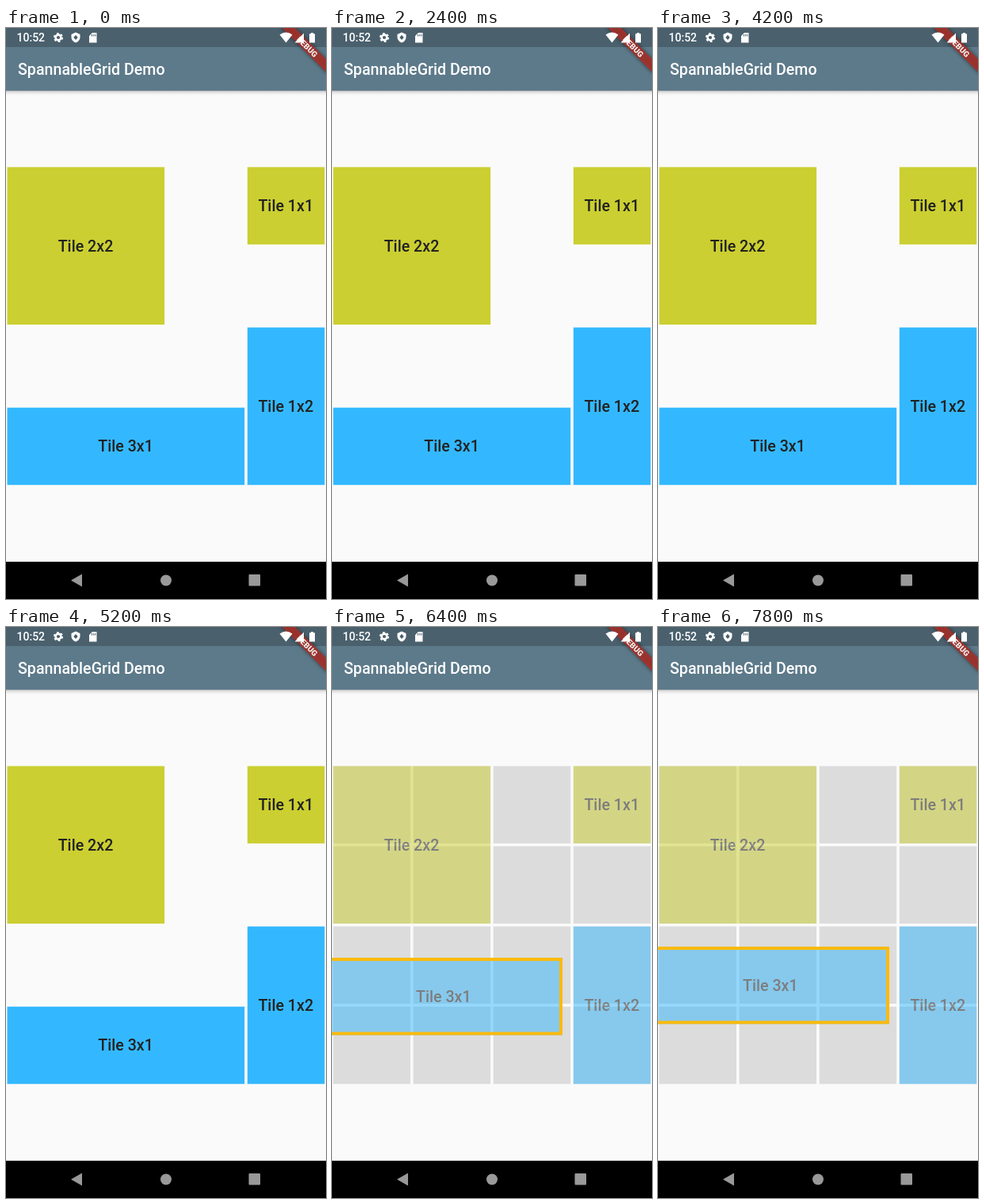
Animation, 404 px wide and 720 px high, one loop 8000 ms. Source, as an HTML page:

```html
<!DOCTYPE html>
<html lang="en">
<head>
<meta charset="utf-8">
<title>SpannableGrid Demo</title>
<style>
  html, body { margin: 0; width: 100%; height: 100%; overflow: hidden; background: #fafafa; }
  svg { display: block; width: 100%; height: 100%; }
  text { font-family: Roboto, sans-serif; font-weight: 500; }
  .label { font-size: 19.65px; fill: #212121; text-anchor: middle; }
</style>
</head>
<body>
<svg viewBox="0 0 404 720">
  <defs>
    <linearGradient id="shade" x2="0" y2="1">
      <stop offset="0" stop-color="#000" stop-opacity=".28"/>
      <stop offset=".35" stop-color="#000" stop-opacity=".09"/>
      <stop offset="1" stop-color="#000" stop-opacity="0"/>
    </linearGradient>
    <filter id="soft" x="-20%" y="-100%" width="140%" height="300%">
      <feGaussianBlur stdDeviation="2.5"/>
    </filter>
  </defs>
  <rect width="404" height="720" fill="#fafafa"/>

  <g id="cells" fill="#dcdcdc"></g>
  <g id="tiles"></g>

  <!-- app bar -->
  <rect y="79" width="404" height="6" fill="url(#shade)"/>
  <rect width="404" height="79" fill="#5d7a8a"/>
  <rect width="404" height="24" fill="#4a606d"/>
  <text x="15" y="58.7" font-size="19.65" fill="#fff">SpannableGrid Demo</text>

  <!-- corner ribbon -->
  <g transform="translate(404 0) rotate(45)">
    <rect x="-42" y="27.5" width="84" height="11.8" opacity=".5" filter="url(#soft)"/>
    <rect x="-42" y="27.5" width="84" height="11.8" fill="#a8312b" fill-opacity=".88"/>
    <text y="37" font-size="10" style="font-weight:900" fill="#f4eeee" text-anchor="middle">DEBUG</text>
  </g>

  <!-- status bar -->
  <g fill="#fff">
    <text x="13.5" y="17" font-size="14">10:52</text>
    <g transform="translate(66 12)">
      <circle r="3.4" fill="none" stroke="#fff" stroke-width="2.6"/>
      <circle r="5.1" fill="none" stroke="#fff" stroke-width="2" stroke-dasharray="2.67"/>
    </g>
    <path d="M88 5.5l5.5 2.4v3.7c0 3.2-2.3 6-5.5 7-3.2-1-5.500-3.800-5.500-7V7.900z"/>
    <path d="M88 8.700l2.700 3.200-2.700 3.200-2.700-3.200z" fill="#4a606d"/>
    <path d="M109 6h5.500v12.500h-9.500V10z"/>
    <path d="M108.500 8v2.500M110.700 8v2.500M112.800 8v2.500" stroke="#4a606d" stroke-width="1"/>
    <path d="M353.500 18.500L345.500 8.500q8-6 16 0z"/>
    <path d="M364.500 18.500L376 6.500v12z"/>
    <path d="M383 7.300h2V6h3v1.300h2v11.200h-7z"/>
  </g>

  <!-- navigation bar -->
  <rect y="673" width="404" height="47"/>
  <g fill="#999">
    <path d="M82 696.500l14-8v16z"/>
    <circle cx="202" cy="696.500" r="7"/>
    <rect x="306.500" y="689" width="14.500" height="14.500" rx="1"/>
  </g>
</svg>
<script>
const LOOP = 8000, STEP = 200, LIFT = 6400, SETTLE = 7200;
const PITCH = 101.1, SIZE = 97.5;
const LIME = '#cbcf31', BLUE = '#33b8ff';
const cells = document.getElementById('cells');
const tiles = document.getElementById('tiles');

function add(parent, name, attrs = {}, text = '') {
  const node = document.createElementNS('http://www.w3.org/2000/svg', name);
  for (const key in attrs) node.setAttribute(key, attrs[key]);
  node.textContent = text;
  return parent.appendChild(node);
}

const area = (col, row, cols, rows) => ({
  x: 1.5 + col * PITCH,
  y: 175.4 + row * PITCH,
  width: (cols - 1) * PITCH + SIZE,
  height: (rows - 1) * PITCH + SIZE
});

function addTile(col, row, cols, rows, fill) {
  const box = area(col, row, cols, rows);
  const group = add(tiles, 'g');
  const face = add(group, 'g');
  add(face, 'rect', { ...box, fill });
  add(face, 'text', {
    class: 'label',
    x: box.x + box.width / 2 - 0.3,
    y: box.y + box.height / 2 + 7
  }, `Tile ${cols}x${rows}`);
  return { group, face, box };
}

for (let i = 0; i < 16; i++) add(cells, 'rect', area(i % 4, i >> 2, 1, 1));

const all = [
  addTile(0, 0, 2, 2, LIME),
  addTile(3, 0, 1, 1, LIME),
  addTile(3, 2, 1, 2, BLUE),
  addTile(0, 3, 3, 1, BLUE)
];
const dragged = all[3];
const { x, y, width, height } = dragged.box;
const border = add(dragged.group, 'rect', {
  x: x + 2, y: y + 2, width: width - 4, height: height - 4,
  fill: 'none', stroke: '#fbba0c', 'stroke-width': 4
});

function draw(now) {
  const time = Math.floor((now % LOOP) / STEP) * STEP;
  const editing = time >= LIFT;
  cells.style.display = border.style.display = editing ? '' : 'none';
  for (const tile of all) tile.face.setAttribute('opacity', editing ? 0.5 : 1);

  const p = Math.min(1, Math.max(0, (time - LIFT) / (SETTLE - LIFT)));
  const ease = 1 - (1 - p) ** 2;
  const dx = editing ? -10.2 + ease : 0;
  const dy = editing ? -61.6 - 14 * ease : 0;
  dragged.group.setAttribute('transform', `translate(${dx} ${dy})`);
}

const start = performance.now();
function tick() {
  draw(performance.now() - start);
  requestAnimationFrame(tick);
}
tick();
</script>
</body>
</html>
```
